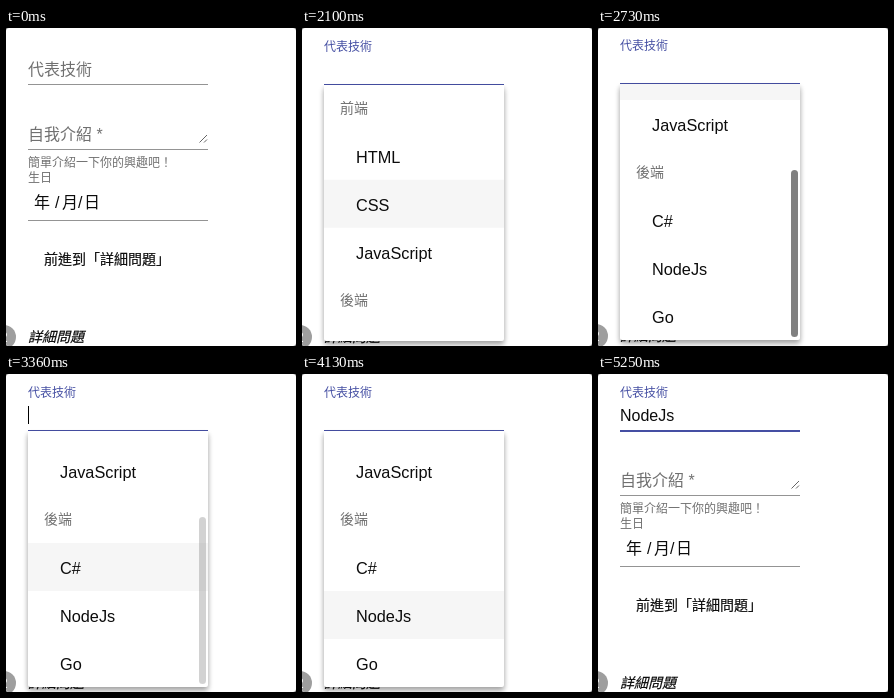
An HTML page that plays this animation: 290x318 px, repeating every 5390 ms.

```html
<!DOCTYPE html>
<html lang="zh-Hant">
<head>
<meta charset="utf-8">
<title>代表技術</title>
<style>
  :root {
    --loop: 5390ms;
    --accent: #454fa3;
    --hint: #707070;
    --ink: #0c0c0c;
    --hover: #f6f6f6;
    --swift: cubic-bezier(.25, .8, .25, 1);
  }
  html, body { margin: 0; width: 100%; height: 100%; overflow: hidden; }
  html { background: #666; }
  .stage {
    position: relative; width: 290px; height: 318px; overflow: hidden;
    background: #fff; border-radius: 3px;
    font: 16px "Liberation Sans", "Noto Sans CJK TC", "Noto Sans CJK", sans-serif;
    color: var(--ink);
  }
  .page { position: absolute; inset: 0; animation: bounce var(--loop) linear infinite; }
  svg { position: absolute; left: 0; top: 0; overflow: visible; }
  text { fill: var(--ink); white-space: pre; }
  .hint { fill: var(--hint); }
  .small { font-size: 12px; }
  .mid { font-size: 14px; stroke: var(--ink); stroke-width: .2px; }
  .rule { fill: #949494; }

  .label { animation: float var(--loop) linear infinite; }
  .value { animation: value var(--loop) step-end infinite; }
  .caret { animation: caret var(--loop) step-end infinite; }
  .ripple { fill: var(--accent); transform-origin: 112px 57px; animation: ripple var(--loop) linear infinite; }
  .shade { animation: shade var(--loop) linear infinite; }

  .panel {
    position: absolute; left: 22px; top: 57px; width: 180px; height: 256px;
    overflow: hidden; background: #fff; border-radius: 0 0 2px 2px;
    box-shadow: 0 3px 5px rgba(0,0,0,.24), 0 4px 6px rgba(0,0,0,.18);
    animation: panel var(--loop) step-end infinite;
  }
  .list { --to: -128px; animation: scroll var(--loop) linear infinite; }
  .list div { height: 48px; line-height: 50px; padding-left: 32px; font-size: 16.3px; }
  .list .group { line-height: 48px; padding-left: 16px; font-size: 14px; color: var(--hint); }
  .thumb {
    --to: 84px;
    position: absolute; left: 171px; top: 2px; width: 7px; height: 167px;
    border-radius: 4px; background: #808080;
    animation: scroll var(--loop) linear infinite, thumb var(--loop) linear infinite;
  }
  .css { animation: hover-css var(--loop) step-end infinite; }
  .cs { animation: hover-cs var(--loop) step-end infinite; }
  .node { animation: hover-node var(--loop) step-end infinite; }
  .go { animation: hover-go var(--loop) step-end infinite; }

  /* the page moves by whole pixels so thin lines stay crisp */
  @keyframes bounce {
    0% { transform: translateY(0); }
    49.3% { transform: translateY(0); animation-timing-function: steps(2); }
    51.9% { transform: translateY(-2px); animation-timing-function: step-end; }
    53.2% { transform: translateY(-1px); animation-timing-function: step-end; }
    57.1% { transform: translateY(0); }
    66.7% { transform: translateY(0); animation-timing-function: steps(7); }
    70.1% { transform: translateY(-7px); }
    71.5% { transform: translateY(-7px); animation-timing-function: step-end; }
    72.7% { transform: translateY(-8px); animation-timing-function: steps(8); }
    76.6%, 100% { transform: translateY(0); }
  }
  @keyframes float {
    0% { transform: translate(22px, 47px); fill: var(--hint); }
    22.08% { transform: translate(22px, 47px); fill: var(--hint); animation-timing-function: var(--swift); }
    29.5%, 100% { transform: translate(22px, 22.6px) scale(.75); fill: var(--accent); }
  }
  @keyframes value {
    0% { opacity: 0; }
    77.88%, 100% { opacity: 1; }
  }
  @keyframes caret {
    0% { opacity: 0; transform: none; }
    22.04% { opacity: 1; }
    31.1% { opacity: 0; }
    40.2% { opacity: 1; }
    49.3% { opacity: 0; }
    61% { opacity: 1; }
    67.5% { opacity: 0; transform: none; }
    80.14% { opacity: 1; transform: translateX(55px); }
    89.55%, 100% { opacity: 0; transform: translateX(55px); }
  }
  @keyframes ripple {
    0%, 22.04% { opacity: 0; transform: scaleX(.5); }
    22.05% { opacity: 1; transform: scaleX(.5); animation-timing-function: var(--swift); }
    27.64%, 77.88% { opacity: 1; transform: scaleX(1); }
    80.13% { opacity: 0; transform: scaleX(1); }
    80.14% { opacity: 1; transform: scaleX(.5); animation-timing-function: var(--swift); }
    85.7%, 100% { opacity: 1; transform: scaleX(1); }
  }
  @keyframes shade {
    0%, 77.6% { opacity: 0; }
    80.4%, 87.9% { opacity: .12; }
    91.3%, 100% { opacity: 0; }
  }
  @keyframes panel {
    0% { visibility: hidden; }
    22.04% { visibility: visible; }
    77.88%, 100% { visibility: hidden; }
  }
  @keyframes scroll {
    0% { transform: translateY(0); }
    38.6% { transform: translateY(0); animation-timing-function: cubic-bezier(.3, .05, .4, 1); }
    49.8%, 100% { transform: translateY(var(--to)); }
  }
  @keyframes thumb {
    0%, 39% { opacity: 0; }
    40.2%, 60% { opacity: 1; }
    63.6%, 100% { opacity: 0; }
  }
  @keyframes hover-css {
    0%, 55.8%, 100% { background: none; }
    28.5% { background: var(--hover); }
  }
  @keyframes hover-cs {
    0%, 67.5%, 100% { background: none; }
    55.8% { background: var(--hover); }
  }
  @keyframes hover-go {
    0%, 75.3%, 100% { background: none; }
    67.5% { background: var(--hover); }
  }
  @keyframes hover-node {
    0%, 100% { background: none; }
    75.3% { background: var(--hover); }
  }
</style>
</head>
<body>
<div class="stage">
  <div class="page">
    <svg width="290" height="318">
      <rect class="rule" x="22" y="56" width="180" height="1"/>
      <rect class="ripple" x="22" y="56" width="180" height="2"/>
      <text class="label">代表技術</text>
      <text class="value" x="22" y="47">NodeJs</text>
      <rect class="caret" x="22" y="32" width="1" height="18"/>

      <text class="hint" x="22" y="112">自我介紹 *</text>
      <path d="M193.5 114.5l7.5-7.5M198 114.5l3-3" stroke="#666" fill="none"/>
      <rect class="rule" x="22" y="121" width="180" height="1"/>
      <text class="hint small" x="22" y="139">簡單介紹一下你的興趣吧！</text>
      <text class="hint small" x="22" y="153.7">生日</text>
      <text y="180" x="28 49 56 72 78">年/月/日</text>
      <rect class="rule" x="22" y="192" width="180" height="1"/>

      <rect class="shade" x="22" y="213" width="158" height="36" rx="2"/>
      <text class="mid" x="38" y="236.3">前進到「詳細問題」</text>

      <circle cx="-2" cy="309" r="12" fill="#9e9e9e"/>
      <text x="-2" y="314" font-size="14" text-anchor="middle" style="fill:#fff">2</text>
      <text class="mid" x="22" y="314.3" font-style="italic">詳細問題</text>
    </svg>
    <div class="panel">
      <div class="list">
        <div class="group">前端</div>
        <div>HTML</div>
        <div class="css">CSS</div>
        <div>JavaScript</div>
        <div class="group">後端</div>
        <div class="cs">C#</div>
        <div class="node">NodeJs</div>
        <div class="go">Go</div>
      </div>
      <div class="thumb"></div>
    </div>
  </div>
</div>
</body>
</html>
```
